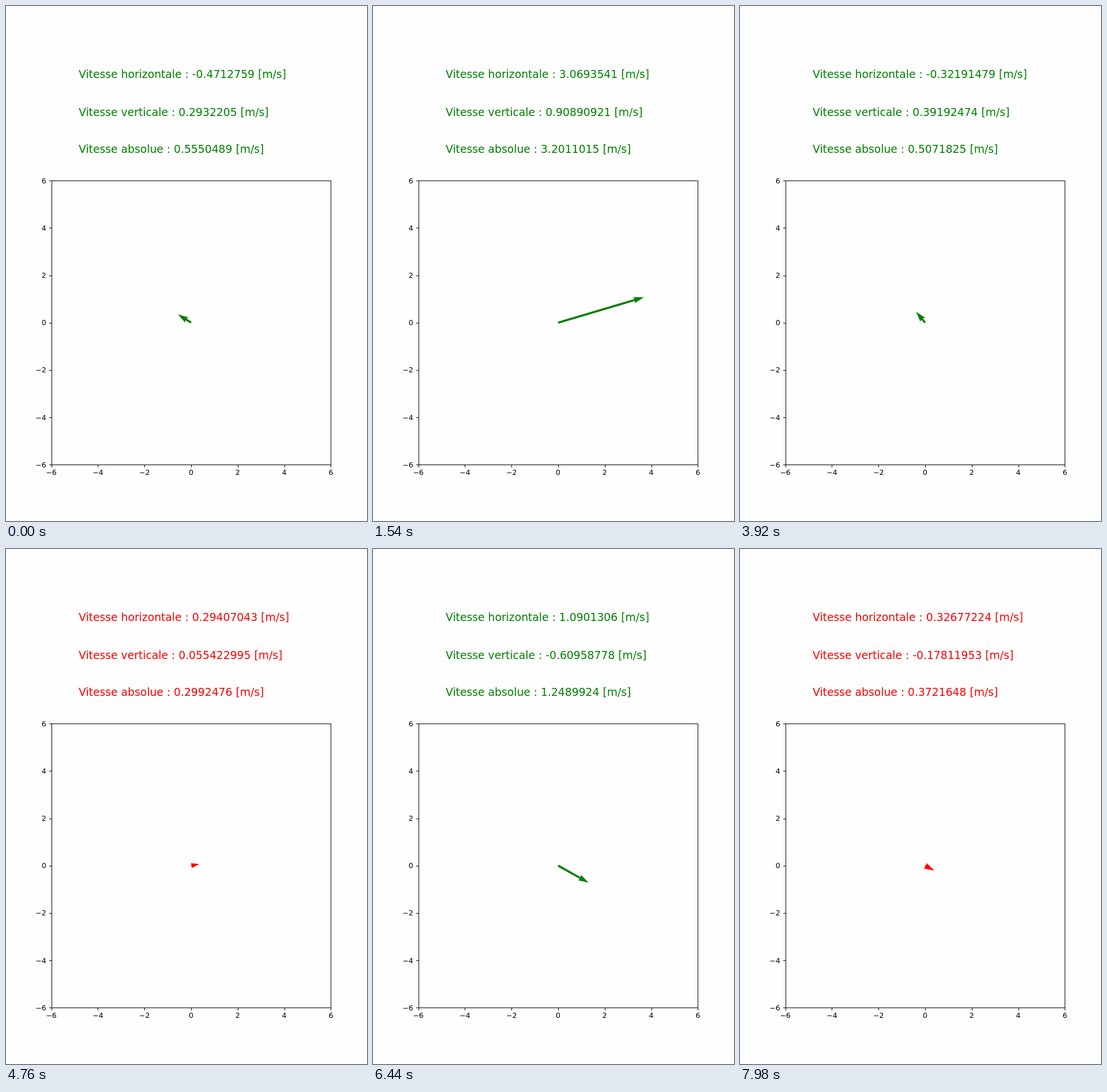
Animation, 626 px wide and 894 px high, one loop 8000 ms. Source, as an HTML page:

```html
<!DOCTYPE html>
<html lang="fr">
<head>
<meta charset="utf-8">
<title>Vitesse</title>
<style>
html, body { margin: 0; width: 100%; height: 100%; overflow: hidden; background: #fefefe; }
svg { display: block; width: 626px; height: 894px; }
text { font-family: "DejaVu Sans", sans-serif; white-space: pre; }
#axes { stroke: #000; fill: none; shape-rendering: crispEdges; }
#labels { font-size: 12.5px; }
#readout { font-size: 18.75px; }
</style>
</head>
<body>
<svg viewBox="0 0 626 894">
  <path id="axes"/>
  <g id="labels"></g>
  <g id="live">
    <polygon id="arrow"/>
    <g id="readout">
      <text x="126" y="125"></text>
      <text x="126" y="191"></text>
      <text x="126" y="255"></text>
    </g>
  </g>
</svg>
<script>
const STEP = 140, LOOP = 8000;
const box = { left: 78.6, right: 563.4, top: 303.2, bottom: 796.1 };
const span = box.right - box.left;
const unit = span / 10;      // arrow pixels per m/s
const shaft = span * 0.0075; // arrow shaft width
const $ = id => document.getElementById(id);

const toX = v => box.left + (v + 6) / 12 * span;
const toY = v => box.bottom - (v + 6) / 12 * (box.bottom - box.top);
const snap = p => Math.round(p) + 0.5;

function addLabel(value, x, y, anchor) {
  const el = document.createElementNS("http://www.w3.org/2000/svg", "text");
  el.setAttribute("x", x);
  el.setAttribute("y", y);
  el.setAttribute("text-anchor", anchor);
  el.textContent = String(value).replace("-", "\u2212");
  $("labels").append(el);
}

function drawAxes() {
  const [l, r, t, b] = [box.left, box.right, box.top, box.bottom].map(snap);
  let d = `M${l} ${t}H${r}V${b}H${l}Z`;
  for (let v = -6; v <= 6; v += 2) {
    d += `M${snap(toX(v))} ${b}v4.5M${l} ${snap(toY(v))}h-4.5`;
    addLabel(v, toX(v), 814, "middle");
    addLabel(v, 69.6, Math.round(toY(v) + 4.6), "end");
  }
  $("axes").setAttribute("d", d);
}

// Key poses; swing bends the horizontal speed on the way to the next pose.
const poses = [
  { step: 0, vx: -0.4712759, vy: 0.2932205, swing: -2.5 },
  { step: 11, vx: 3.0693541, vy: 0.90890921, swing: 1.5 },
  { step: 19, vx: 0.96635823, vy: 0.48523934, swing: 0 },
  { step: 28, vx: -0.32191479, vy: 0.39192474, swing: 0 },
  { step: 40, vx: 0.91005565, vy: -0.28107875, swing: -0.8 },
  { step: 46, vx: 1.0901306, vy: -0.60958778, swing: 0 },
  { step: 57, vx: 0.32677224, vy: -0.17811953 }
];

const mix = (a, b, p) => a * (1 - p) + b * p;

function speedAt(step) {
  const i = Math.max(1, poses.findIndex(k => k.step >= step));
  const a = poses[i - 1], b = poses[i];
  const p = (step - a.step) / (b.step - a.step);
  const bend = p < 1 ? a.swing * Math.sin(Math.PI * p) : 0;
  return [mix(a.vx, b.vx, p) + bend, mix(a.vy, b.vy, p)];
}

// Short arrows shrink as a whole instead of losing their shaft.
function arrowPoints(vx, vy) {
  const size = Math.hypot(vx, vy) * unit / shaft;
  const k = shaft * Math.min(1, size / 5), n = Math.max(size, 5);
  const half = [[0, 0.5], [n - 4.5, 0.5], [n - 5, 1.5], [n, 0]];
  const mirror = half.slice(0, 3).reverse().map(([x, y]) => [x, -y]);
  const a = Math.atan2(-vy, vx), c = Math.cos(a), s = Math.sin(a);
  return [...half, ...mirror].map(([x, y]) =>
    `${toX(0) + k * (x * c - y * s)},${toY(0) + k * (x * s + y * c)}`).join(" ");
}

const digits = v => String(+v.toPrecision(8));
const lines = $("readout").children;
let shown = -1;

function render(time) {
  const step = Math.floor(time % LOOP / STEP);
  if (step === shown) return;
  shown = step;
  const [vx, vy] = speedAt(step), speed = Math.hypot(vx, vy);
  $("live").setAttribute("fill", speed < 0.5 ? "#ff0000" : "#008000");
  $("arrow").setAttribute("points", arrowPoints(vx, vy));
  lines[0].textContent = `Vitesse horizontale : ${digits(vx)} [m/s]`;
  lines[1].textContent = `Vitesse verticale : ${digits(vy)} [m/s]`;
  lines[2].textContent = `Vitesse absolue : ${+speed.toFixed(7)} [m/s]`;
}

drawAxes();
const start = performance.now();
function tick() {
  render(performance.now() - start);
  requestAnimationFrame(tick);
}
tick();
</script>
</body>
</html>
```
